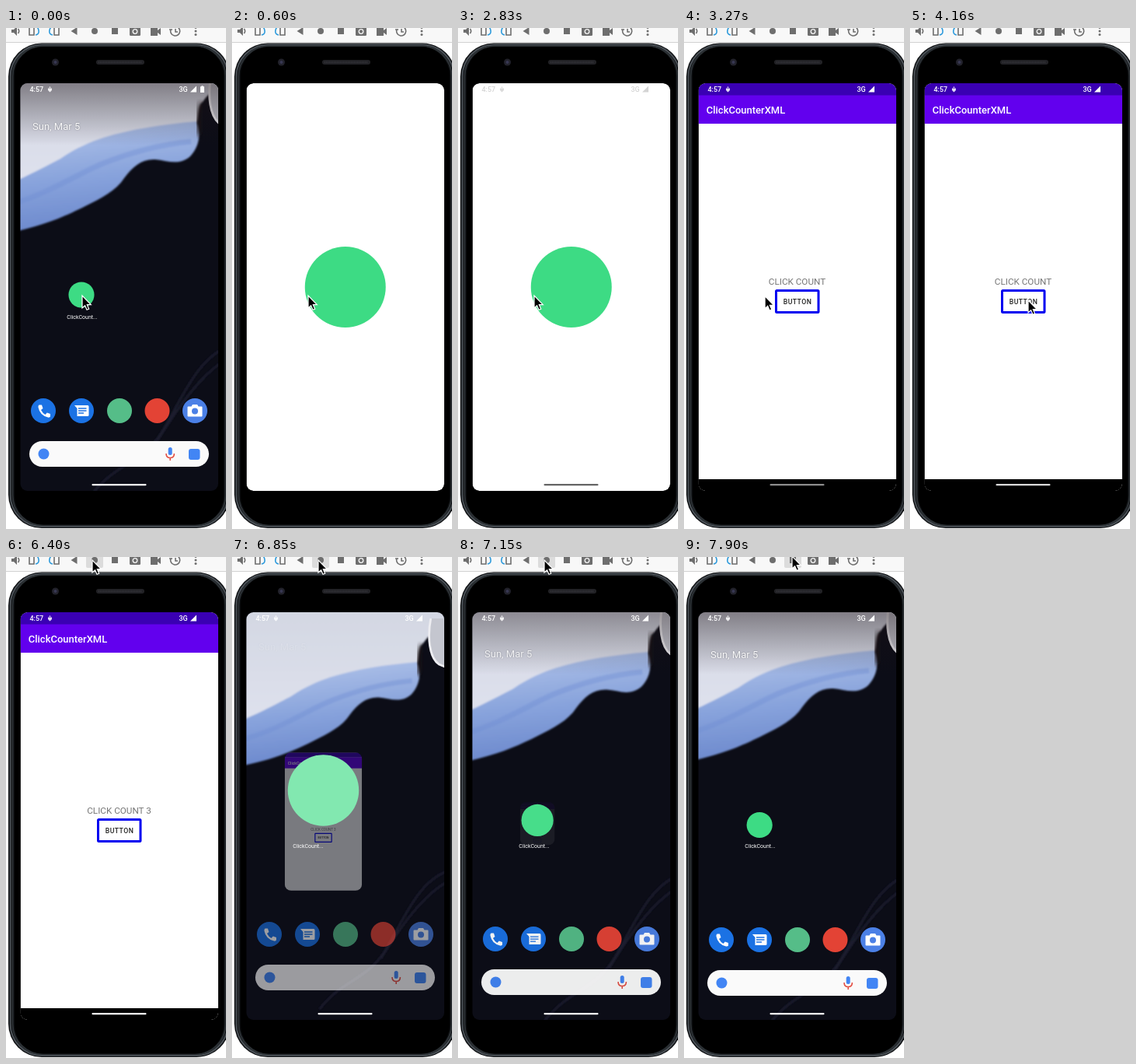
These frames come from a looping animation (283x644 px, 8 s). An HTML page:

```html
<!DOCTYPE html>
<html lang="en">
<head>
<meta charset="utf-8">
<title>Click counter demo</title>
<style>
  html, body { margin: 0; width: 100%; height: 100%; overflow: hidden; background: #fff; }
  svg { display: block; width: 283px; height: 644px; font-family: Roboto, "Open Sans", sans-serif; }
  .medium { font-weight: 500; }
  .mid { text-anchor: middle; }
  .line { fill: none; stroke: #6e6e6e; stroke-width: 1.6; }
</style>
</head>
<body>
<svg viewBox="0 0 283 644">
  <defs>
    <clipPath id="screen"><rect x="18.5" y="71" width="254.5" height="524" rx="9"/></clipPath>
    <clipPath id="winClip"><rect id="winShape" width="254.5" height="524" rx="9"/></clipPath>
    <linearGradient id="sky" x2="0" y2="1">
      <stop offset=".2" stop-color="#d3d7e2"/><stop offset="1" stop-color="#dfe2ee"/>
    </linearGradient>
    <linearGradient id="blue" x1=".3" x2=".5" y2="1">
      <stop offset=".1" stop-color="#a9bde6"/><stop offset=".5" stop-color="#88a3dc"/><stop offset="1" stop-color="#6784ca"/>
    </linearGradient>
    <linearGradient id="shade" x2="0" y2="1">
      <stop stop-color="#1c1013" stop-opacity=".45"/><stop offset="1" stop-color="#1c1013" stop-opacity="0"/>
    </linearGradient>
    <filter id="soft"><feGaussianBlur stdDeviation="1"/></filter>
    <filter id="haze"><feGaussianBlur stdDeviation="3"/></filter>
  </defs>

  <!-- emulator toolbar -->
  <rect width="283" height="18" fill="#f8f8f8"/>
  <rect y="18" width="283" height="1" fill="#d2d2d2"/>
  <rect id="hover" y="-4" width="22" height="18" rx="2" fill="#dcdcdc"/>
  <g fill="#6e6e6e">
    <path d="M7 2h3l4-4v12l-4-4H7z"/>
    <path class="line" d="M15.500 1q2.500 3 0 6M30 -2v11h6v-11M62 -2v11h6v-11"/>
    <path class="line" style="stroke:#2f9bdc" d="M38 9q5-1 4-6t-4-4M60 9q-5-1-4-6t4-4"/>
    <path d="M83.500 4l8-5v10z"/>
    <circle cx="114" cy="4" r="4"/>
    <rect x="136" y="0" width="8" height="8"/>
    <rect x="159" y="-1" width="14" height="11" rx="1.500"/>
    <circle cx="166" cy="4.500" r="2.800" stroke="#f8f8f8" stroke-width="1.300"/>
    <path d="M186 -1h9v4l4-3v9l-4-3v4h-9z"/>
    <path class="line" d="M212 2a6 6 0 1 0 6-4M218 1v4h3M210 2h4"/>
    <circle cx="244" cy="-.5" r="1.500"/><circle cx="244" cy="4" r="1.500"/><circle cx="244" cy="8.500" r="1.500"/>
  </g>

  <!-- phone body -->
  <rect x="3" y="19.500" width="285" height="623.500" rx="43" fill="#0c0e10"/>
  <rect x="5.500" y="21.500" width="280" height="619.500" rx="41" fill="none" stroke="#4b5157" stroke-width="2"/>
  <rect x="8.500" y="23" width="274" height="616.500" rx="39" fill="none" stroke="#2c3135" stroke-width="2"/>
  <rect x="11" y="24" width="269" height="614.500" rx="37"/>
  <circle cx="63.500" cy="44" r="4.500" fill="#22222b"/><circle cx="63.500" cy="44" r="2" fill="#383853"/>
  <rect x="116" y="41" width="62" height="6" rx="3" fill="#222226"/>
  <path d="M119 44h56" stroke="#34343a" stroke-width="2" stroke-dasharray="1 1"/>

  <g clip-path="url(#screen)">
    <g id="home">
      <g id="wall">
        <rect x="-20" y="10" width="340" height="650" fill="#0c0d17"/>
        <path d="M285 410C245 425 225 480 200 520S140 560 110 600M285 425C250 445 220 490 195 530" fill="none" stroke="#1b1e2d" stroke-width="3" filter="url(#soft)"/>
        <g filter="url(#soft)">
          <path d="M-10 10H310V80L266 82C258 86 256 92 250 98 246 108 248 118 244 126 200 132 150 142 110 156S40 188-10 208Z" fill="url(#sky)"/>
          <path d="M-10 206C30 190 50 178 70 168 90 154 110 146 125 141 160 130 200 124 245 120 251 136 249 152 237 165 222 178 207 170 192 169 175 168 163 178 152 193 142 209 122 219 102 229 72 244 45 256-10 266Z" fill="url(#blue)"/>
          <path d="M-10 230C45 220 90 188 125 174S195 150 238 146" fill="none" stroke="#6f8dd2" stroke-width="7" opacity=".4"/>
        </g>
        <path d="M252 96C243 112 252 124 246 138" fill="none" stroke="#1a1515" stroke-width="6" opacity=".7" filter="url(#haze)"/>
        <path d="M264 60C259 86 262 114 275 123L300 134V60Z" fill="#c4c6cf"/>
        <path d="M264 60C259 86 262 114 275 123L300 134" fill="none" stroke="#ededf1" stroke-width="3"/>
      </g>
      <rect id="scrim" x="18" y="71" width="256" height="80" fill="url(#shade)"/>
      <text id="date" x="34" y="130.500" font-size="13" fill="#fff" style="text-shadow:0 0 2px #0006">Sun, Mar 5</text>

      <g id="dock">
        <circle cx="48" cy="492" r="16" fill="#1b72e4"/>
        <path d="M42.500 484.500l3.500 0 1.500 4.500-2.500 2q2 4 5.500 6l2.300-2.500 4.200 1.500v3.500q-1 1.500-3 1-10.500-2.500-12.500-13-.2-2 1-3z" fill="#fff"/>
        <circle cx="97" cy="492" r="16" fill="#1b72e4"/>
        <path d="M88 485h17q1.500 0 1.500 1.500v11q0 1.500-1.500 1.500H91.500v-10z" fill="#fff"/>
        <path d="M93 489h10.500M93 492h10.500M93 495h7" stroke="#1b72e4" stroke-width="1.300"/>
        <circle cx="146" cy="492" r="16" fill="#55bd88"/>
        <circle cx="194.500" cy="492" r="16" fill="#e34335"/>
        <circle cx="243" cy="492" r="16" fill="#4b80e6"/>
        <path d="M234.500 486.500h4l1.500-2.500h6l1.500 2.500h4q1 0 1 1v11q0 1-1 1h-17q-1 0-1-1v-11q0-1 1-1z" fill="#fff"/>
        <circle cx="243" cy="492.500" r="4" fill="#4b80e6"/>
        <rect x="30" y="531" width="231" height="33" rx="16.500" fill="#fafafa"/>
        <circle cx="48.500" cy="547.500" r="7" fill="#4285f4"/>
        <rect x="208.700" y="539" width="5" height="10" rx="2.500" fill="#4285f4"/>
        <path d="M206 547q0 5.500 5.200 5.500t5.200-5.500M211.200 552.500v3.500" fill="none" stroke="#e35045" stroke-width="1.600"/>
        <rect x="235" y="541" width="14.500" height="14" rx="3" fill="#4285f4"/>
      </g>
    </g>

    <g id="win" clip-path="url(#winClip)">
      <rect width="254.500" height="524" fill="#fff"/>
      <g id="app">
        <rect width="254.500" height="16" fill="#3a00b3"/>
        <rect y="15.500" width="254.500" height="36.500" fill="#6200ee"/>
        <text class="medium" x="10.200" y="39" font-size="13" fill="#fff">ClickCounterXML</text>
        <text id="count" class="mid" x="127" y="258.700" font-size="11.700" fill="#757575">CLICK COUNT</text>
        <rect x="100" y="266.500" width="54.500" height="28" rx="1" fill="#fff" stroke="#0000f0" stroke-width="3"/>
        <text class="medium mid" x="127.500" y="283.700" font-size="8.700" letter-spacing=".45" fill="#222">BUTTON</text>
        <rect y="509" width="254.500" height="15"/>
      </g>
    </g>
    <circle id="icon"/>
    <text id="label" class="mid" x="98" y="373.500" font-size="7" fill="#fff">ClickCount...</text>

    <g id="status">
      <text class="medium" x="30.500" y="82.300" font-size="9">4:57</text>
      <path d="M56.500 75l1.300 1.800h-2.600zM54 77.500h5v2.500l-2.500 2.500-2.500-2.500z" opacity=".85"/>
      <text class="medium" x="222.500" y="82.300" font-size="9">3G</text>
      <path d="M245 74.500v8h-8z"/>
      <path id="battery" d="M251.500 74.300h2v1h1.500v7.700h-5v-7.700h1.500z"/>
    </g>
    <rect id="pill" x="110.500" y="586" width="70" height="2.300" rx="1.100"/>
  </g>

  <path id="cursor" d="M0 0V16L3.600 12.700 6 18.300 8.700 17.200 6.300 11.700H11.300Z" stroke="#fff" stroke-width="1.200"/>
</svg>

<script>
const LOOP = 8000, FRAME = 148.5;
const CLOSE = 46 * FRAME;   // first frame of the way back home
const CLOSE_SIZE = .29;     // window size at that moment, 1 is full screen

// Pointer stops: time, x, y
const stops = [
  [3100, 98, 344], [3900, 152, 350], [4750, 152, 350], [5250, 148, 544],
  [6050, 111, 4], [7300, 111, 4], [7860, 139, -1]
];

const $ = id => document.getElementById(id);
const set = (id, attrs) => { for (const k in attrs) $(id).setAttribute(k, attrs[k]); };
const lerp = (a, b, p) => a + (b - a) * p;
const ramp = (t, from, to) => Math.min(1, Math.max(0, (t - from) / (to - from)));
const smooth = p => p * p * (3 - 2 * p);
const grey = light => `hsl(0 0% ${light}%)`;

function pointer(t) {
  const i = stops.findIndex(s => s[0] > t);
  if (i < 1) return stops.at(i).slice(1);
  const [t0, x0, y0] = stops[i - 1], [t1, x1, y1] = stops[i];
  const p = smooth(ramp(t, t0, t1));
  return [lerp(x0, x1, p), lerp(y0, y1, p)];
}

function drawHome(away) {
  set("wall", { transform: `translate(145.7 333) scale(${1 - .07 * away}) translate(-145.7 -333)` });
  set("scrim", { opacity: 1 - away });
  set("date", { opacity: lerp(.9, .12, away), transform: `translate(0 ${-11 * away})` });
  set("dock", { opacity: 1 - .4 * away, transform: `translate(0 ${-7 * away})` });
}

// The window grows out of the launcher icon and shrinks back into it.
function drawWindow(t, size, closing) {
  const w = lerp(36, 254.5, size), h = lerp(36, 524, size);
  const x = lerp(97, 145.75, size ** .7) - w / 2, y = lerp(325, 71, size);
  const scale = w / 254.5;
  set("win", {
    transform: `translate(${x} ${y}) scale(${scale})`,
    opacity: closing ? 1.55 * size : Math.ceil(size)
  });
  set("winShape", { height: h / scale, rx: lerp(8, 9, size) / scale });

  const r = Math.min(52, w * .46);
  const loaded = ramp(t, 2830, 3150);
  set("app", { opacity: loaded });
  set("icon", {
    cx: x + w / 2,
    cy: closing ? y + r + 3 : y + h / 2,
    r,
    fill: `hsl(147 69% ${closing ? 55 + 55 * size : 55}%)`,
    opacity: closing ? 1 : 1 - loaded
  });
}

function draw(time) {
  const t = Math.floor(time / FRAME) * FRAME;
  const closing = t >= CLOSE;
  const size = closing ? CLOSE_SIZE * Math.exp((CLOSE - t) / 150) : smooth(ramp(t, 300, 590));

  drawHome(Math.min(1, size / CLOSE_SIZE));
  drawWindow(t, size, closing);
  set("home", { visibility: size === 1 ? "hidden" : "visible" });
  set("label", { opacity: closing || size === 0 ? 1 : 0 });
  set("battery", { opacity: size === 0 ? 1 : 0 });

  // System bars dim over the white splash and brighten again over the app.
  const back = ramp(t, 2830, 3150);
  set("status", { fill: grey(100 - 17 * ramp(t, 594, 890) * (1 - back)) });
  set("pill", { fill: grey(100 - 60 * ramp(t, 594, 2400) * (1 - ramp(t, 2830, 4600))) });

  const clicks = Math.min(3, Math.max(0, Math.floor(time / FRAME) - 28));
  $("count").textContent = "CLICK COUNT" + (clicks ? " " + clicks : "");

  const [px, py] = pointer(t);
  set("cursor", { transform: `translate(${px} ${py})` });
  set("hover", { x: px > 127 ? 129 : 103, opacity: py < 14 ? 1 : 0 });
}

const start = performance.now();
function tick() {
  draw((performance.now() - start) % LOOP);
  requestAnimationFrame(tick);
}
tick();
</script>
</body>
</html>
```
